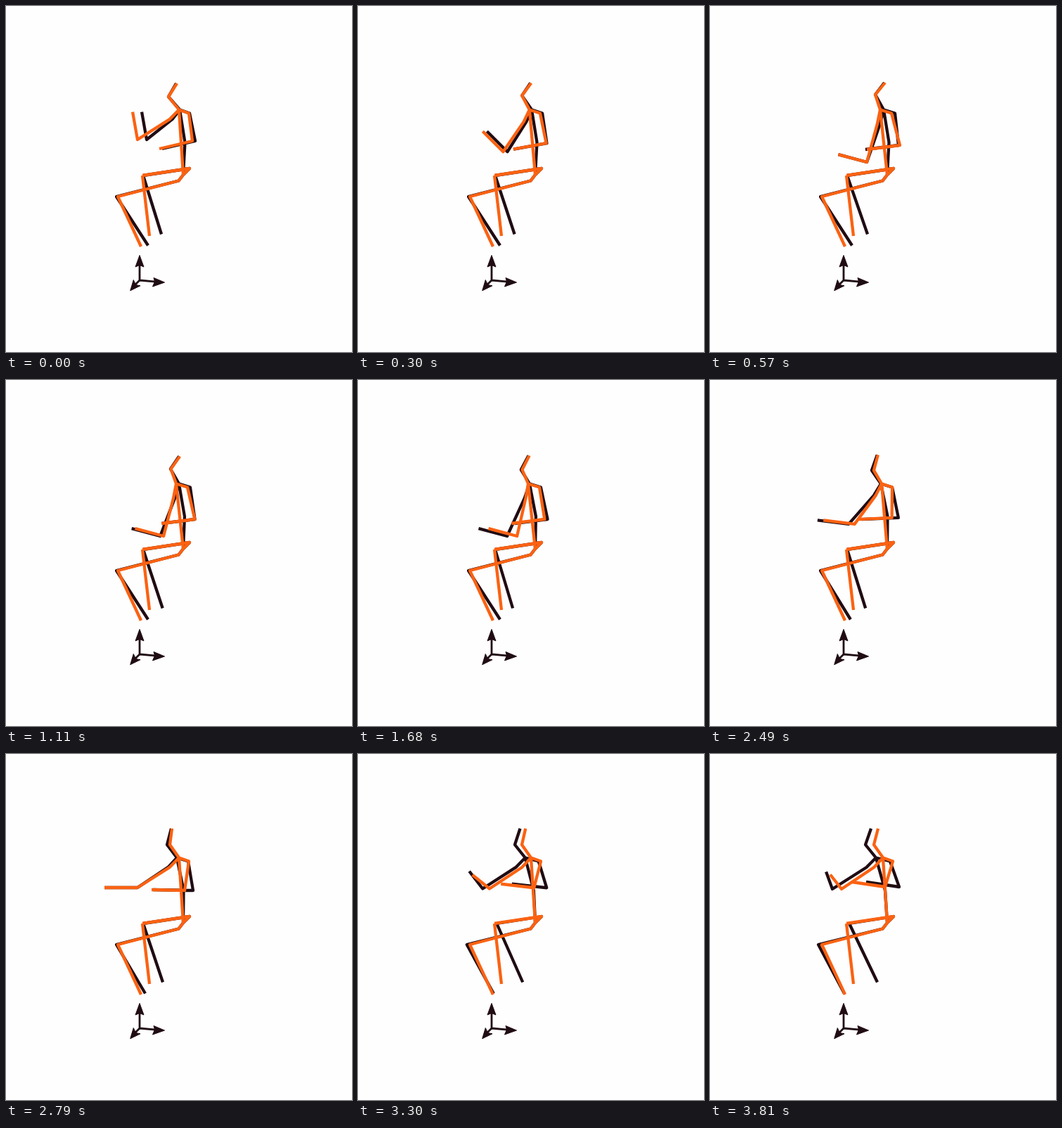
These frames come from a looping animation (492x492 px, 3840 ms). An HTML page:

```html
<!DOCTYPE html>
<html lang="en">
<head>
<meta charset="utf-8">
<title>Two seated skeletons</title>
<style>
  html, body { margin: 0; width: 100%; height: 100%; overflow: hidden; background: #fefefe; }
  svg { display: block; width: 100vw; height: 100vh; }
  .bones { fill: none; stroke-width: 4.3; stroke-linejoin: round; }
  .axes { fill: #200c13; stroke: #200c13; stroke-linejoin: round; }
  #dark { stroke: #200c13; }
  #bright { stroke: #fb6212; }
</style>
</head>
<body>
<svg viewBox="0 0 492 492">
  <g class="axes">
    <path d="M190 366V390L216 392.3M190 390L182 398" fill="none" stroke-width="2.8"/>
    <path d="M190 354.5L196 371L190 368.5L184 371ZM225.5 393L208.5 399L211.5 392L210 386.5ZM176.7 404.8L181.3 389.5L184.5 396.5L191 397.8Z"/>
  </g>
  <path class="bones" id="dark"/>
  <path class="bones" id="bright"/>
</svg>
<script>
const LOOP = 3840, STEP = 30;
const chains = [
  "kneeR hipR pelvis hipL kneeL footL",
  "kneeR footR",
  "head neck chest spine pelvis",
  "chest armL elbowL handL",
  "chest armR elbowR handR"
].map(chain => chain.split(" "));

const progress = (t, from, to) => Math.min(1, Math.max(0, (t - from) / (to - from)));
const smooth = u => u * u * (3 - 2 * u);
const easeOut = u => u * (2 - u);

// Weights of the movement's phases: arm raised, arm lowered, slow drift, reach, fold.
function phases(t) {
  const down = smooth(progress(t, 0, 570));
  const reach = smooth(progress(t, 2160, 2790));
  return {
    start: 1 - down,
    low: down * (1 - reach),
    drift: smooth(progress(t, 570, 2160)) * (1 - reach),
    reach,
    fold: easeOut(progress(t, 2790, 3810))
  };
}

// Joints of one figure; gap is 1 for the dark one, which strays from the bright one.
function joints({ start, low, drift, reach, fold }, gap) {
  const pelvis = [252, 240];
  const chest = [246 - 4 * low + gap * (1 + 4 * low - 4 * drift - 4 * reach - 7 * fold), 147.5];
  const elbowL = [
    187 + 36 * low + 4 * drift + gap * (13 * start - 18 * drift - 13 * fold),
    190 + 32 * low + 2 * fold
  ];
  const elbowR = [
    265 + 5 * low - 6 * drift - 11 * reach - 5 * fold
      + gap * (4 * start - 2 * low + 8 * drift + 12 * reach + 8 * fold),
    192 + 6 * low + 2 * reach - 5 * fold
  ];
  const bend = (80 * start + 15 * low + (52 + 18 * gap) * fold) * Math.PI / 180;
  const forearm = 40 + 2 * low + 7 * reach - 21 * fold;

  return {
    pelvis, chest, elbowL, elbowR,
    head: [243 + 6 * low - 7 * drift - 7 * reach + 3 * fold - gap * (1 + 9 * fold),
           110 - low - 2 * drift - 4 * reach],
    neck: [231 + 4 * low - 2 * drift + 2 * reach - gap * (2 * drift + 4 * reach + 8 * fold),
           129 - 3 * low + 2 * drift],
    spine: [(chest[0] + pelvis[0]) / 2 + 5 * gap, 194],
    armL: [chest[0] + 0.22 * (elbowL[0] - chest[0]), chest[1] + 0.22 * (elbowL[1] - chest[1]) + 4],
    handL: [elbowL[0] - forearm * Math.cos(bend), elbowL[1] - forearm * Math.sin(bend)],
    armR: [chest[0] + 14 + 2 * low + gap * (2 * reach + 4 * fold), 152.5],
    handR: [elbowR[0] - 47 - 10 * gap * (reach - fold),
            elbowR[1] + 11 * start + 6 * low - reach - 6 * fold],
    hipL: [245.5, 248.5],
    hipR: [261, 231],
    kneeL: [159 - gap * (2 + 3 * fold), 271],
    footL: [192 + gap * (10 - 4 * reach - 7 * fold), 342 - 1.5 * gap],
    kneeR: [194 + gap * (1 + 3 * fold), 241],
    footR: [204 + gap * (17 + 3 * low - 5 * drift + 2 * reach + 15 * fold), 327 - 2.5 * gap]
  };
}

function bones(body) {
  const point = name => body[name].map(v => v.toFixed(2)).join(" ");
  return chains.map(chain => "M" + chain.map(point).join("L")).join("");
}

const figures = ["bright", "dark"].map(id => document.getElementById(id));

function draw(ms) {
  const now = phases(Math.floor((ms % LOOP) / STEP) * STEP);
  figures.forEach((path, gap) => path.setAttribute("d", bones(joints(now, gap))));
}

const begin = performance.now();
function tick() {
  draw(performance.now() - begin);
  requestAnimationFrame(tick);
}
tick();
</script>
</body>
</html>
```
